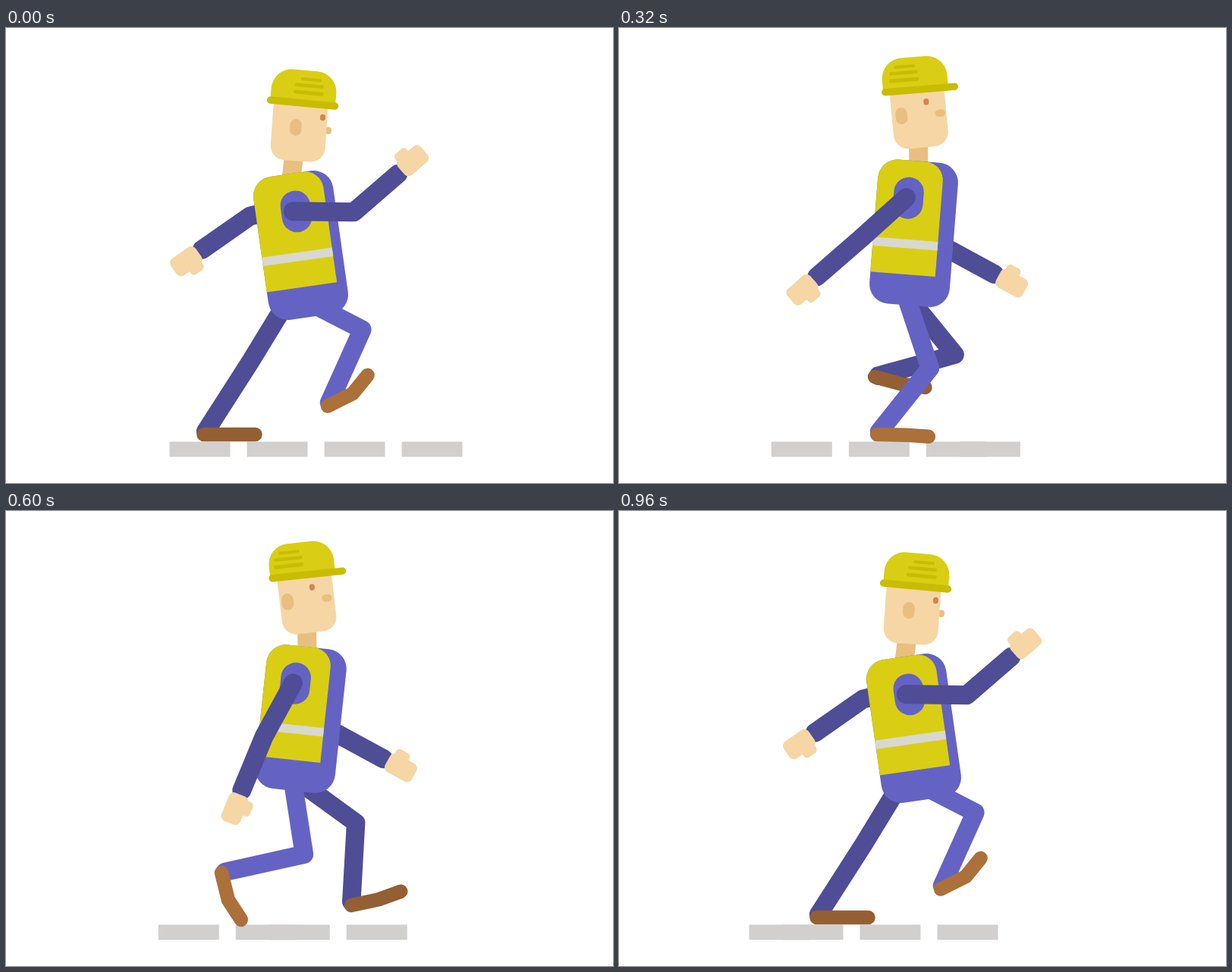
Write an HTML page with a canvas that moves like this. It is 800 by 600 pixels and loops after 1000 ms.

```html
<!DOCTYPE html>
<html lang="en">
<head>
<meta charset="utf-8">
<title>Walking builder</title>
<style>
html, body { margin: 0; height: 100%; overflow: hidden; background: #fff; }
canvas { display: block; }
</style>
</head>
<body>
<canvas id="stage" width="800" height="600"></canvas>
<script>
const ctx = document.getElementById('stage').getContext('2d');
const RAD = Math.PI / 180;
const C = {
  ground: '#d1d0ce', suit: '#6463c3', dark: '#4e4d96', vest: '#d9ce14', brim: '#c8bd02',
  band: '#d8d8d0', skin: '#f6d6a4', shade: '#e8bf80', eye: '#cf864e',
  shoe: '#ac703a', shoeFar: '#945f33'
};

// One walk cycle is 24 steps.
// Legs: step, thigh angle, heel x, heel y, foot angle, toe angle
const LEG = [
  [0, 27.3, 424, 498.5, -26.6, -51],
  [2, 36, 455, 520, -12, -20],
  [4, 47.7, 444.5, 536, 0, 0],
  [7, 63.2, 366, 536, 1, 4],
  [8, 71.6, 340, 536, 1, 4],
  [11, 121.4, 260.5, 536, 0, 0],
  [13, 94.4, 267, 503, 51.6, 18.4],
  [15, 81.2, 284, 477, 76, 57],
  [17, 66.7, 308, 462, 61, 59],
  [19, 50.9, 337, 460, 15, 8],
  [20, 39.8, 354.5, 463, 4.5, -7],
  [24, 27.3, 424, 498.5, -26.6, -51]
];
// Arms: step, upper angle, forearm angle
const ARM = [[0, 0.7, -40.8], [4, 72.7, 53.4], [8, 138, 139], [10, 150, 154],
  [13, 154.8, 162], [17, 82.4, 62.7], [20, 35.5, 3.9], [24, 0.7, -40.8]];
const FAR_ARM = [[0, 165.8, 145], [4, 112, 84], [8, 69.6, 28.6],
  [13, 39.9, -9], [17, 95, 66], [20, 141, 115], [24, 165.8, 145]];

function pose(keys, n) {
  const i = keys.findIndex(k => k[0] > n);
  if (i < 0) return keys[keys.length - 1].slice(1);
  const a = keys[i - 1], b = keys[i], f = (n - a[0]) / (b[0] - a[0]);
  return a.map((v, j) => v + (b[j] - v) * f).slice(1);
}

const polar = ([x, y], deg, len) =>
  [x + Math.cos(deg * RAD) * len, y + Math.sin(deg * RAD) * len];

function line(points, width, color, cap = 'round') {
  ctx.beginPath();
  points.forEach(p => ctx.lineTo(...p));
  ctx.lineWidth = width;
  ctx.strokeStyle = color;
  ctx.lineCap = cap;
  ctx.lineJoin = 'round';
  ctx.stroke();
}

function box(x, y, w, h, r, color) {
  ctx.beginPath();
  ctx.roundRect(x, y, w, h, r);
  ctx.fillStyle = color;
  ctx.fill();
}

const pill = (cx, cy, w, h, color) =>
  box(cx - w / 2, cy - h / 2, w, h, Math.min(w, h) / 2, color);

function at(x, y, deg, draw) {
  ctx.save();
  ctx.translate(x, y);
  ctx.rotate(deg * RAD);
  draw();
  ctx.restore();
}

function arm(shoulder, [upper, fore]) {
  const elbow = polar(shoulder, upper, 80), wrist = polar(elbow, fore, 77);
  line([shoulder, elbow, wrist], 25, C.dark);
  at(...wrist, fore, () => {
    box(6, -14, 40, 27, 7, C.skin);
    box(10, -22, 20, 14, 5, C.skin);
  });
}

function leg(n, color, shoe) {
  const [thigh, hx, hy, foot, toe] = pose(LEG, n);
  const hip = [377, 350], heel = [hx, hy], knee = polar(hip, thigh, 104);
  const shin = Math.atan2(hy - knee[1], hx - knee[0]) / RAD;
  line([hip, knee, polar(heel, shin, -5)], 24.5, color);
  const ball = polar(heel, foot, 37);
  line([heel, ball, polar(ball, toe, 31)], 18.5, shoe);
}

function torso(m, cy) {
  const tilt = -8.1 + 1.58 * m, vestW = 93.3 - 0.95 * m;
  at(388.5, cy, tilt, () => {
    box(-53, -95.3, 106, 190.6, 26, C.suit);
    box(-53, -95.3, vestW, 150.3, [26, 24, 0, 0], C.vest);
    box(-53, 8.8, vestW, 11.5, 0, C.band);
  });
  at(382.4 - 0.12 * m, cy - 44.6 - 0.24 * m, tilt, () => pill(0, 0, 39.5, 55, C.suit));
}

function head(m, y) {
  at(388.7 + 0.45 * m, y, 4 - 1.2 * m, () => {
    const eye = 30 - 2.38 * m;
    if (m < 3) pill(38.7 - 1.36 * m, 33.6, 8 + 1.6 * m, 9.5, C.shade);
    box(-36, -10, 72, 86.5, 19, C.skin);
    if (m >= 3) pill(38.7 - 1.36 * m, 33.6, 13.5, 9.5, C.shade);
    pill(-4.5 - 2.35 * m, 32.4, 15.5, 22, C.shade);
    ctx.save();
    ctx.clip(new Path2D('M-36 0H36V76H-36Z'));
    pill(eye, 17, 7, 8.5, C.eye);
    pill(eye + 31.3, 17, 7, 8.5, C.eye);
    ctx.restore();
  });
  at(391, y, 5.3 - 1.25 * m, () => {
    const x = -3.5 - 2.6 * m;
    box(-43, -43.3, 86, 43.3, [27, 27, 0, 0], C.vest);
    ctx.save();
    ctx.clip();
    line([[x, -31.7], [x + 24, -31.7]], 4, C.brim);
    line([[x - 6.5, -23.5], [x + 27, -23.5]], 4.5, C.brim);
    line([[x - 7.5, -14], [x + 27.5, -14]], 5, C.brim);
    ctx.restore();
    line([[-42.6 + 0.28 * m, 0], [42.7 + 1.1 * m, 0]], 9.5, C.brim);
  });
}

function ground(n) {
  for (let i = 0; i < 4; i++) {
    let x = 521.5 - 102 * i - n * 350 / 24;
    if (x < 171.4) x += 350;
    box(x, 545.5, 80, 20, 0, C.ground);
  }
}

function draw(n) {
  const m = n <= 12 ? n : 24 - n; // body sways there and back
  const cy = m < 6 ? 286.5 - 3.75 * m : 264 + 3.35 * (m - 6);
  const brimY = cy - 187.5 - 0.22 * m;
  ctx.clearRect(0, 0, 800, 600);
  ground(n);
  arm([399, cy - 58], pose(FAR_ARM, n));
  leg((n + 11) % 24, C.dark, C.shoeFar);
  leg(n, C.suit, C.shoe);
  line([[379.5 + 1.9 * m, brimY + 70], [375.5 + 2.4 * m, cy - 84]], 25, C.shade, 'butt');
  torso(m, cy);
  arm([378.4, cy - 44.8 - 0.26 * m], pose(ARM, n));
  head(m, brimY);
}

function tick() {
  draw(Math.floor(performance.now() % 1000 / 40));
  requestAnimationFrame(tick);
}
tick();
</script>
</body>
</html>
```
